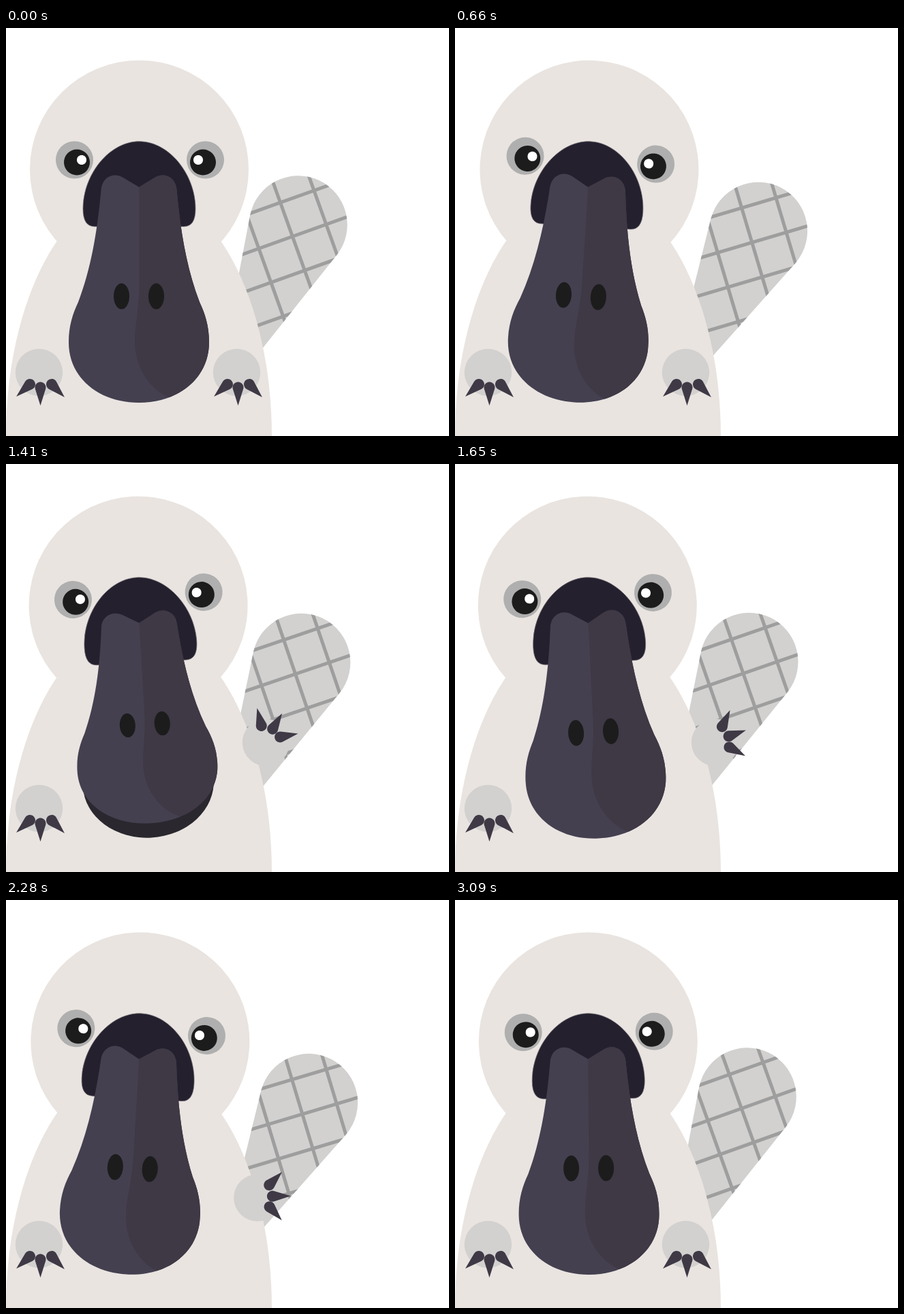
An HTML page that plays this animation: 650x600 px, repeating every 3.12 s.

```html
<!DOCTYPE html>
<html lang="en">
<head>
<meta charset="utf-8">
<title>Waving platypus</title>
<style>
  html, body { margin: 0; width: 100%; height: 100%; overflow: hidden; background: #fff; }
  svg { display: block; width: 650px; height: 600px; }
</style>
</head>
<body>
<svg viewBox="0 0 650 600">
  <defs>
    <path id="tailShape" d="M358.3 274.5A72 72 0 1 1 486 333L340 517L312 517Z"/>
    <path id="billShape" d="M195.3 234L171 219.5C158 212 141 219 139.5 238C135 288 127 348 106 403C98 420 92 438 92 462C92 516 138 551 195 551S298 516 298 462C298 438 292 420 284 403C263 348 255 288 250.5 238C249 219 232 212 219 219.5Z"/>
    <clipPath id="tailClip"><use href="#tailShape"/></clipPath>
    <clipPath id="billClip"><use href="#billShape"/></clipPath>
    <path id="claw" d="M-7.6 2.5A8 8 0 1 1 7.6 2.5L0 26.8Z"/>
    <g id="paw">
      <circle r="34.7" fill="#d2d1cf"/>
      <g fill="#3f3946">
        <use href="#claw" transform="translate(2 22)"/>
        <use href="#claw" transform="translate(-13.5 17.5) rotate(48)"/>
        <use href="#claw" transform="translate(18.5 17.5) rotate(-45)"/>
      </g>
    </g>
  </defs>

  <g id="tail">
    <use href="#tailShape" fill="#d2d1cf"/>
    <g clip-path="url(#tailClip)">
      <path transform="translate(418 300) rotate(-19.7)" fill="none" stroke="#9e9e9e" stroke-width="5"
        d="M-52.5 -150V125M0 -150V125M52.5 -150V125M-150 -46H150M-150 7H150M-150 60H150M-150 113H150"/>
    </g>
  </g>

  <ellipse cx="195" cy="600" rx="195" ry="364" fill="#e9e4e0"/>

  <g id="head">
    <circle cx="195.5" cy="208" r="160.5" fill="#e9e4e0"/>
    <g fill="#afafaf"><circle cx="100.5" cy="194" r="27.5"/><circle cx="292.5" cy="194" r="27.5"/></g>
    <g fill="#1c1c1c"><circle cx="104" cy="197.5" r="19"/><circle cx="289" cy="197.5" r="19"/></g>
    <g fill="#fff">
      <path class="glint" transform="translate(111 194)"/>
      <path class="glint" transform="translate(282 194)"/>
    </g>
    <path fill="#25202e" stroke="#6f6a72" stroke-width=".7"
      d="M134 292H130Q113 292 113 266C113 215 152 166.8 195.5 166.8S278 215 278 266Q278 292 261 292Z"/>
    <ellipse cx="195" cy="470" rx="96" ry="80" fill="#2a272e"/>
    <g id="bill">
      <use href="#billShape" fill="#454050"/>
      <path clip-path="url(#billClip)" fill="#3f3845"
        d="M195.3 200V380C195.3 410 189 435 189 462C189 495 208 530 238 543L260 560H320V200Z"/>
      <g fill="#1c1c1c">
        <ellipse cx="169.5" cy="394.5" rx="11.5" ry="19"/>
        <ellipse cx="220.5" cy="394.5" rx="11.5" ry="19"/>
      </g>
    </g>
  </g>

  <use href="#paw" transform="translate(48.5 506.5)"/>
  <use href="#paw" id="wavingPaw"/>
</svg>
<script>
const LOOP = 3120, STEP = 30;
const WAVE_START = 1320, WAVE_END = 2120, WAVE_PERIOD = 400;
const byId = id => document.getElementById(id);
const tail = byId('tail'), head = byId('head'), bill = byId('bill'), paw = byId('wavingPaw');
const glints = document.querySelectorAll('.glint');

// [time, value] pairs, eased in and out between neighbours
const HEAD_TILT = [[0, 0], [710, 3.6], [1510, -3.6], [2180, 3.6], [2909, -3.6], [3140, 0]];
const TAIL_TILT = [[0, 0], [790, 3.4], [1600, 0.5], [2500, 3.4], [3090, 0], [3121, 0]];
const PAW_RAISE = [[0, 0], [780, 0], [WAVE_START, 1], [WAVE_END, 1], [2560, 0], [3121, 0]];

const mix = (a, b, k) => a + (b - a) * k;

function track(keys, t) {
  const i = keys.findIndex(([time]) => time > t);
  const [t0, v0] = keys[i - 1], [t1, v1] = keys[i];
  return mix(v0, v1, (1 - Math.cos(Math.PI * (t - t0) / (t1 - t0))) / 2);
}

function bump(t, start, end) {
  return t > start && t < end ? Math.sin(Math.PI * (t - start) / (end - start)) ** 2 : 0;
}

// Round highlight that narrows to a lens as k goes from 0 to 1
function glintPath(k) {
  const w = mix(7, 7.7, k), y = mix(0, -2, k);
  const topX = mix(7, 3, k), topY = mix(-9.33, -4, k);
  const lowX = mix(7, 4, k), lowY = mix(9.33, 5.5, k);
  return `M${-w} ${y}C${-topX} ${topY} ${topX} ${topY} ${w} ${y}C${lowX} ${lowY} ${-lowX} ${lowY} ${-w} ${y}Z`;
}

function draw(t) {
  head.setAttribute('transform', `rotate(${track(HEAD_TILT, t)} 195 232)`);
  tail.setAttribute('transform', `rotate(${track(TAIL_TILT, t)} 269 588)`);

  const open = 0.07 * bump(t, 1200, 1640);
  bill.setAttribute('transform', `translate(0 232) scale(1 ${1 - open}) translate(0 -232)`);

  const raise = track(PAW_RAISE, t);
  const waving = t > WAVE_START && t < WAVE_END;
  const swing = waving ? 21 * Math.sin(2 * Math.PI * (t - WAVE_START) / WAVE_PERIOD) : 0;
  paw.setAttribute('transform',
    `translate(${338.5 + 43 * raise} ${506.5 - 97 * raise}) rotate(${-128 * raise - swing})`);

  const shape = glintPath(bump(t, 1800, 2040));
  glints.forEach(g => g.setAttribute('d', shape));
}

const start = performance.now();
function tick() {
  const t = (performance.now() - start) % LOOP;
  draw(Math.floor(t / STEP) * STEP);
  requestAnimationFrame(tick);
}
tick();
</script>
</body>
</html>
```
